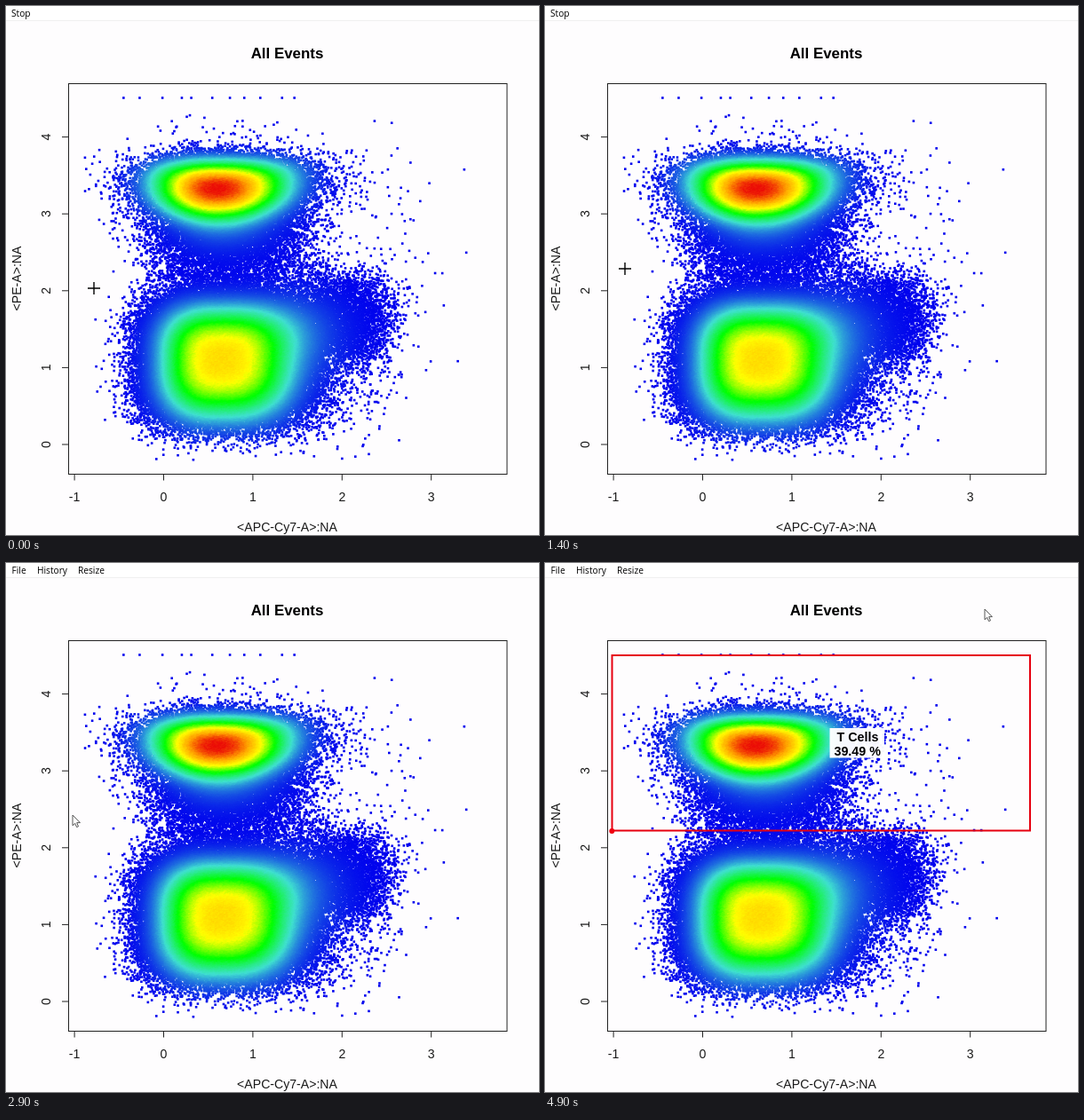
An HTML page with a canvas for the animation above (5 s loop, 600 by 596 pixels).

```html
<!DOCTYPE html>
<html lang="en">
<head>
<meta charset="utf-8">
<title>All Events</title>
<style>
html, body { margin: 0; width: 100%; height: 100%; overflow: hidden; background: #fefdfe; }
canvas, svg { position: absolute; left: 0; top: 0; width: 600px; height: 596px; }
text { font: 14.1px "Liberation Sans", Arial, sans-serif; fill: #1a1a1a; text-anchor: middle; }
.title { font-size: 16.9px; font-weight: bold; fill: #000; }
.label { font-size: 14.3px; font-weight: bold; fill: #000; }
.menu text { font: 10.2px "Open Sans", "Noto Sans", sans-serif; fill: #000; text-anchor: start; }
.line { fill: none; stroke: #222; }
</style>
</head>
<body>
<canvas id="plot" width="600" height="596"></canvas>
<svg viewBox="0 0 600 596">
  <rect width="600" height="16" fill="#fff"/>
  <path d="M0 16.5H600" stroke="#f0f0f0"/>
  <g class="menu" id="busy"><text x="6" y="12">Stop</text></g>
  <g class="menu" id="idle">
    <text x="6.5" y="12">File</text><text x="35" y="12">History</text><text x="81" y="12">Resize</text>
  </g>
  <text class="title" x="316.5" y="59">All Events</text>
  <rect class="line" x="70.5" y="87.5" width="493.5" height="440"/>
  <g id="axes"></g>
  <text x="316.5" y="592">&lt;APC-Cy7-A&gt;:NA</text>
  <text transform="translate(16.5 307) rotate(-90)">&lt;PE-A&gt;:NA</text>
  <g id="gate">
    <rect x="75.5" y="104" width="470.5" height="197.5" fill="none" stroke="#e6000f" stroke-width="2"/>
    <circle cx="75.3" cy="302" r="3" fill="#f00010"/>
    <rect x="320.5" y="186" width="61.5" height="33.5" fill="#fff" fill-opacity=".96"/>
    <text class="label" x="352" y="201">T Cells</text>
    <text class="label" x="351.7" y="217">39.49 %</text>
  </g>
  <path id="cross" d="M-7 0H7M0 -7V7" stroke="#000" stroke-width="1.4"/>
  <path id="arrow" d="M0 0V11.8L2.7 9.3L4.6 13.6L6.5 12.8L4.7 8.6H8.4Z"
    fill="#fff" stroke="#444" stroke-width=".9"/>
</svg>
<script>
const $ = id => document.getElementById(id);

// axes
const px = v => 177.5 + v * 100.4, py = v => 494 - v * 86.6;
let ticks = "", marks = "";
for (let v = -1; v <= 4; v++) {
  if (v < 4) {
    ticks += `M${px(v)} 527.5v7`;
    marks += `<text x="${px(v)}" y="557.5">${v}</text>`;
  }
  if (v >= 0) {
    ticks += `M70.5 ${py(v)}h-7.5`;
    marks += `<text transform="translate(50 ${py(v)}) rotate(-90)">${v}</text>`;
  }
}
$("axes").innerHTML = `<path class="line" d="${ticks}"/>${marks}`;

// seeded random numbers
let seed = 20;
function rand() {
  seed = (seed + 0x6D2B79F5) | 0;
  let t = Math.imul(seed ^ (seed >>> 15), seed | 1);
  t ^= t + Math.imul(t ^ (t >>> 7), t | 61);
  return ((t ^ (t >>> 14)) >>> 0) / 4294967296;
}

// soft ellipse, reaching a little further right and down
const SKEW = 1.15;
function cloud(x, y, peak, cx, cy, w, h, n = 2) {
  const u = Math.abs(x - cx) / (x < cx ? w : w * SKEW);
  const v = Math.abs(y - cy) / (y < cy ? h : h * SKEW);
  return peak * Math.exp(-(u ** n) - v ** n);
}

// colour level: two populations with faint tails
function heat(x, y) {
  const bent = y + (x - 237) ** 2 * 0.0009;
  return cloud(x, bent, 4.95, 237, 206, 60, 26, 2.2)
    + cloud(x, y, 3.35, 242, 399, 61, 53, 2.7)
    + cloud(x, y, 0.4, 243, 245, 50, 28)
    + cloud(x, y, 0.4, 330, 370, 45, 45);
}

// chance of a dot: populations, bridge, right shoulder, then stray events
function cover(x, y) {
  return cloud(x, y, 4, 240, 198, 58, 21)
    + cloud(x, y, 1.2, 240, 230, 55, 36)
    + cloud(x, y, 4, 240, 395, 70, 53, 3)
    + cloud(x, y, 0.3, 250, 290, 72, 60, 3)
    + cloud(x, y, 0.55, 375, 350, 44, 41, 3)
    + cloud(x, y, 0.12, 340, 420, 50, 40)
    + cloud(x, y, 0.015, 375, 195, 30, 24)
    + cloud(x, y, 0.006, 385, 300, 60, 120)
    + cloud(x, y, 0.006, 240, 140, 80, 20)
    + cloud(x, y, 0.0007, 450, 270, 65, 110);
}

const ramp = [[0, 0, 238], [64, 224, 208], [0, 255, 0], [255, 255, 0], [255, 160, 0], [235, 12, 8]];
function color(level) {
  const l = Math.min(4.999, level), i = Math.floor(l);
  return `rgb(${ramp[i].map((c, k) => Math.round(c + (ramp[i + 1][k] - c) * (l - i)))})`;
}

const ctx = $("plot").getContext("2d");
function dot(x, y, level) {
  ctx.fillStyle = color(level);
  ctx.fillRect(x - 1.3, y - 1.3, 2.6, 2.6);
}

for (let y = 106; y < 512; y++) {
  for (let x = 86; x < 548; x++) {
    if (rand() > cover(x, y)) continue;
    dot(x + rand() - 0.5, y + rand() - 0.5, heat(x, y) * (0.97 + rand() * 0.06));
  }
}
// events clipped at the upper limit
for (let i = 0; i < 11; i++) dot(131 + i * 19 + rand() * 10, 103.5, 0);

// pointer paths: time, x, y
const crossPath = [[0, 99, 318], [1000, 94, 297], [1800, 86, 295], [2500, 75, 302]];
const arrowPath = [[2500, 75, 302], [2800, 75, 284], [3600, 75, 284], [4200, 514, 33], [4900, 495, 52]];
const MENU = 2500, GATE = 3200, LOOP = 5000;

function place(id, path, t) {
  let i = 0;
  while (i < path.length - 2 && t >= path[i + 1][0]) i++;
  const [t0, x0, y0] = path[i], [t1, x1, y1] = path[i + 1];
  const k = Math.max(0, Math.min(1, (t - t0) / (t1 - t0))), e = k * k * (3 - 2 * k);
  $(id).setAttribute("transform", `translate(${x0 + (x1 - x0) * e} ${y0 + (y1 - y0) * e})`);
}
const show = (id, on) => { $(id).style.visibility = on ? "visible" : "hidden"; };

const start = performance.now();
function draw() {
  const t = Math.floor(((performance.now() - start) % LOOP) / 100) * 100;
  const done = t >= MENU;
  show("busy", !done);
  show("cross", !done);
  show("idle", done);
  show("arrow", done);
  show("gate", t >= GATE);
  place("cross", crossPath, t);
  place("arrow", arrowPath, t);
  requestAnimationFrame(draw);
}
draw();
</script>
</body>
</html>
```
